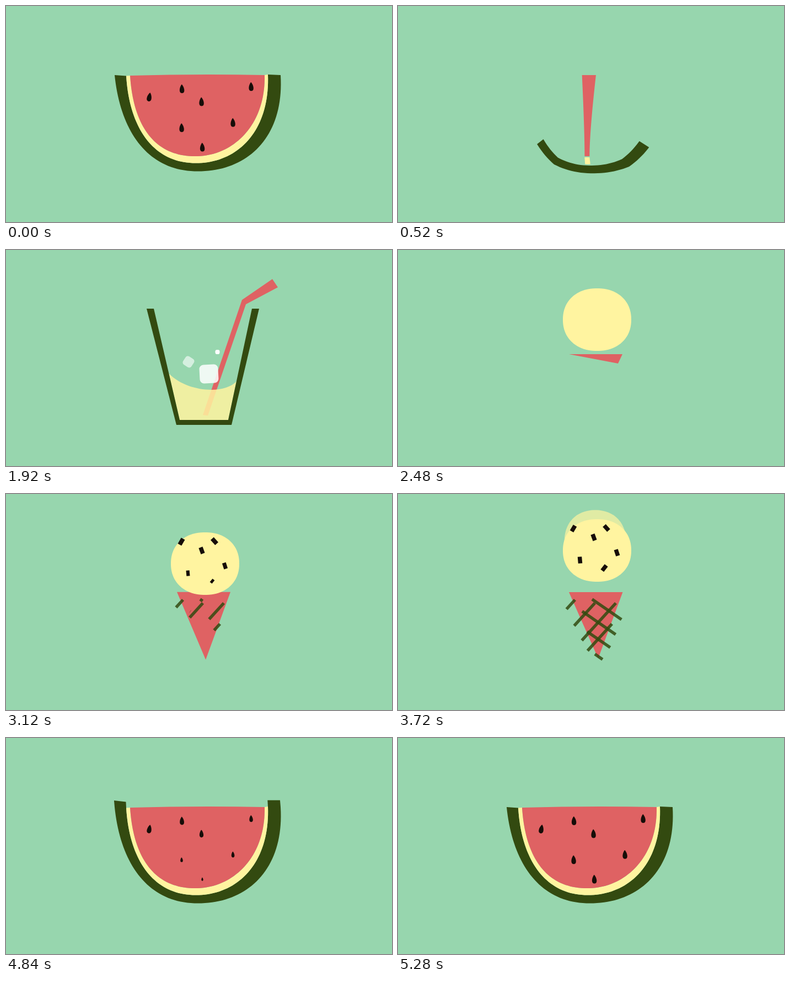
These frames come from a looping animation (700 by 394 pixels, 5520 ms). An HTML page with a canvas:

```html
<!DOCTYPE html>
<html lang="en">
<head>
<meta charset="utf-8">
<title>Summer treats</title>
<style>
  html, body { margin: 0; width: 100%; height: 100%; overflow: hidden; background: #97d6ae; }
  canvas { display: block; }
</style>
</head>
<body>
<canvas id="stage" width="700" height="394"></canvas>
<script>
const ctx = document.getElementById('stage').getContext('2d');
const LOOP = 5520, STEP = 40;
const BG = '#97d6ae', RIND = '#334a10', CREAM = '#fff4a0', RED = '#df6263', SEED = '#160d08';

// Easing over a time span: plain, overshooting, and there-and-back.
const part = (t, a, b) => Math.min(1, Math.max(0, (t - a) / (b - a)));
const ramp = (t, a, b) => { const k = part(t, a, b); return k * k * (3 - 2 * k); };
const back = (t, a, b) => { const d = part(t, a, b) - 1; return 1 + 2 * d ** 3 + d * d; };
const hump = (t, a, b) => Math.sin(Math.PI * part(t, a, b));

const mix = (a, b, k) => a + (b - a) * k;
const mixAll = (a, b, k) => a.map((v, i) => mix(v, b[i], k));

function bez(p, u) {
  const v = 1 - u, w = [v ** 3, 3 * v * v * u, 3 * v * u * u, u ** 3];
  return [0, 1].map(d => w.reduce((sum, k, i) => sum + k * p[i][d], 0));
}
function fillPoly(pts, color) {
  ctx.beginPath();
  pts.forEach(p => ctx.lineTo(...p));
  ctx.fillStyle = color;
  ctx.fill();
}
function at(x, y, angle, scale, draw) {
  ctx.save();
  ctx.translate(x, y);
  ctx.rotate(angle * Math.PI / 180);
  ctx.scale(scale, scale);
  draw();
  ctx.restore();
}

// Melon arcs: left and right halves, each from the top end to the bottom.
const arc = (left, l1, l2, low, r2, r1, right) => [[left, l1, l2, low], [right, r1, r2, low]];
const OUTER = arc([197, 126], [208, 233], [260, 302], [348, 301.5], [436, 302], [505, 241], [498, 126]);
const INNER = arc([218, 127.5], [224, 226], [270, 287], [344, 286.5], [419, 287], [479, 229], [475, 125]);
const FLESH = arc([225, 127], [231, 221], [271, 274.5], [343, 274], [411, 274.5], [471, 218], [469, 126]);

const stops = from => [from, ...Array.from({ length: 41 }, (_, i) => i / 40).filter(u => u > from)];

// Band between two edges, each edge a function of side and position.
function band(a, b, trims, color) {
  const [l, r] = trims.map(stops);
  fillPoly([
    ...l.map(u => a(0, u)), ...r.map(u => a(1, u)).reverse(),
    ...r.map(u => b(1, u)), ...l.map(u => b(0, u)).reverse()
  ], color);
}

// Glass corners, left to right, outer and inner; it tips upright as it opens.
function glass(t) {
  const k = ramp(t, 1040, 1120), a = mix(10, 0, k) * Math.PI / 180;
  const spread = mix(76, 102, k), high = mix(201, 212, k), lean = mix(-8, -2, k);
  const walls = (thick, foot, floor) =>
    [[lean - spread + thick, -high], [-foot, -floor], [foot, -floor], [lean + spread - thick, -high]]
      .map(([x, y]) => [
        359 + x * Math.cos(a) - y * Math.sin(a),
        mix(310, 319, k) + x * Math.sin(a) + y * Math.cos(a)
      ]);
  return { outer: walls(0, 50, 0), inner: walls(mix(8, 13, k), 44, 9) };
}

const CORNER = .7;
function wall(c, side, u) {
  const [top, foot, other] = side ? [c[3], c[2], c[1]] : c;
  return u < CORNER
    ? mixAll(top, foot, u / CORNER)
    : mixAll(foot, other, (u - CORNER) / (1 - CORNER) / 2);
}

function drawRind(t) {
  const melting = t < 2480;
  const trims = [3955, 3808].map(start => melting
    ? (ramp(t, 80, 560) - ramp(t, 560, 1000)) / 2 + ramp(t, 1920, 2400)
    : 1 - back(t, start, 5280));
  if (trims[1] >= 1) return;
  const morph = melting ? ramp(t, 440, 760) : 0, { outer, inner } = glass(t);
  const edge = (melon, corners) => (side, u) =>
    mixAll(bez(melon[side], u), wall(corners, side, u), morph);
  band(edge(OUTER, outer), edge(INNER, inner), trims, RIND);
}

// How far the melon's filling is pulled down on each side.
const trimsAt = t => [0, 30].map(lead =>
  t < 600 ? ramp(t, 100, 560) : 1 - ramp(t + lead, 4160, 4640));

function drawCream(t) {
  band((s, u) => bez(INNER[s], u), (s, u) => bez(FLESH[s], u), trimsAt(t), CREAM);
}

// A flat top, bulging sides and a rounded bottom; fully trimmed it is a cone.
function drawFlesh(t) {
  const early = t < 600, trims = trimsAt(t);
  const rise = early ? 1 : ramp(t, 3720, 4160);
  const wide = early ? 1 - ramp(t, 40, 320) : ramp(t, 4400, 4640);
  const narrow = early ? ramp(t, 360, 600) : 0;
  const shift = ([x, y]) => [x + 20 * (1 - rise), y + 26 * (1 - rise)];
  const tops = [310, 407.5].map((x, s) =>
    mixAll([mix(x, 342, narrow), mix(179, 126, rise)], FLESH[s][0], wide));
  const ends = trims.map((u, s) => shift(bez(FLESH[s], u)));
  const bends = ends.map((e, s) => mixAll(
    mixAll(tops[s], e, .5), [e[0], mix(e[1], tops[s][1], .3)], rise));
  ctx.beginPath();
  ctx.moveTo(...tops[0]);
  ctx.quadraticCurveTo(...bends[0], ...ends[0]);
  stops(trims[0]).forEach(u => ctx.lineTo(...shift(bez(FLESH[0], u))));
  stops(trims[1]).reverse().forEach(u => ctx.lineTo(...shift(bez(FLESH[1], u))));
  ctx.quadraticCurveTo(...bends[1], ...tops[1]);
  ctx.quadraticCurveTo(345, mix(tops[0][1], 123.5, wide), ...tops[0]);
  ctx.fillStyle = RED;
  ctx.fill();
}

const PIPS = [[260, 166], [319, 151], [354.5, 174.5], [444.5, 147], [411.5, 212.5], [318.5, 222], [356, 257.5]];
function drawPips(t) {
  ctx.fillStyle = SEED;
  PIPS.forEach(([x, y], i) => {
    const d = i * 25;
    const size = 1 - ramp(t, 40 + d, 200 + d) + back(t, 4640 + d, 5080 + d);
    at(x, y, i ? -2 : 10, size, () => {
      ctx.beginPath();
      ctx.moveTo(0, -8);
      ctx.bezierCurveTo(4, -4, 7, 8, 0, 8);
      ctx.bezierCurveTo(-7, 8, -4, -4, 0, -8);
      ctx.fill();
    });
  });
}

// Foot, elbow and tip, then the half width at each of them.
const STRAIGHT = [357.5, 285.5, 345.5, 110, 341.5, 47.5, 4.5, 0, 4.5, 0, 4.5, -.5];
const BENT = [361.5, 301.5, 431.5, 95, 482.5, 70, 4.5, .5, 3.5, 4, 5, 7.5];
const FOLDED = [310, 190, 310, 190, 403, 199, 0, 0, 0, 0, 4, -8];
function drawStraw(t) {
  let p = mixAll(STRAIGHT, BENT, back(t, 1160, 1480));
  const sip = ramp(t, 1640, 1920), hidden = 1 - back(t, 600, 1000);
  p[3] += 60 * hidden;
  p[4] += 5.5 * sip;
  p[5] += 80 * hidden - 9.5 * sip;
  p = mixAll(p, FOLDED, ramp(t, 2160, 2480));
  const sideAt = sign => [0, 2, 4].map(i => [p[i] + sign * p[i + 6], p[i + 1] + sign * p[i + 7]]);
  fillPoly([...sideAt(-1), ...sideAt(1).reverse()], RED);
}

function drawCone(t) {
  const k = back(t, 2480, 3280), y = mix(190, 179, k);
  fillPoly([[310, y], [407, y], mixAll([399, 207], [363, 300], k)], RED);
}

function drawDrink(t) {
  const level = 310 - 169 * (ramp(t, 760, 1040) - ramp(t, 1640, 2200));
  if (level > 295 && t < 1640 || level >= 310) return;
  const calm = ramp(t, 1040, 1480) - ramp(t, 1640, 1920);
  const swell = (1 - calm) * Math.min(1, (310 - level) / 85);
  const slosh = swell * (17 - 21 * Math.cos((t - 1040) / 880 * 3 * Math.PI));
  const [tl, bl, br, tr] = glass(t).inner;
  const onWall = (a, b, y) => mix(a[0], b[0], (y - a[1]) / (b[1] - a[1]));
  const yr = level + slosh / 2.7;
  const xl = onWall(tl, bl, level), xr = onWall(tr, br, yr);
  ctx.globalAlpha = .85;
  ctx.beginPath();
  ctx.moveTo(xl, level);
  ctx.bezierCurveTo(mix(xl, xr, .28), level + 35 * swell, mix(xl, xr, .83), level + slosh, xr, yr);
  ctx.lineTo(...br);
  ctx.lineTo(...bl);
  ctx.fillStyle = CREAM;
  ctx.fill();
  ctx.globalAlpha = 1;
}

// x, y, side, angle, opacity
const ICE = [[368, 226, 34, -3, .85], [331, 204, 18, 33, .6], [383.5, 186, 8, 0, 1]];
function drawIce(t) {
  const drop = 60 * (ramp(t, 1640, 1920) - 1);
  const size = back(t, 1160, 1480) * (1 - ramp(t, 1960, 2160));
  ctx.fillStyle = '#fff';
  for (const [x, y, side, angle, alpha] of ICE) {
    ctx.globalAlpha = alpha;
    at(x, y + drop, angle, size, () => {
      ctx.beginPath();
      ctx.roundRect(-side / 2, -side / 2, side, side, 2 + side / 6);
      ctx.fill();
    });
  }
  ctx.globalAlpha = 1;
}

function blob() {
  const soft = v => Math.sign(v) * Math.abs(v) ** .92;
  ctx.beginPath();
  for (let i = 0; i < 90; i++) {
    const a = i / 45 * Math.PI;
    ctx.lineTo(62 * soft(Math.cos(a)), 57 * soft(Math.sin(a)));
  }
  ctx.fillStyle = CREAM;
  ctx.fill();
}

// x, y, angle
const CHIPS = [[-43, -40, 30], [17, -41, -42], [-6, -24, -20], [36, 4, -18], [-31, 17.5, -5], [13, 32, 38]];
function drawScoop(t) {
  const up = back(t, 2160, 2480), fall = part(t, 3720, 4080);
  const y = mix(300, 127, up) - 24 * ramp(t, 3560, 3720) + 190 * fall * fall;
  const size = up * (1 - ramp(t, 3760, 4080));
  const lift = 25 * part(t, 3560, 3800);
  if (lift) {
    ctx.globalAlpha = .7 * (1 - ramp(t, 3760, 3920));
    at(361 - lift * .2, y - lift, 0, size, () => {
      ctx.scale(1 - lift / 170, 1);
      blob();
    });
    ctx.globalAlpha = 1;
  }
  at(361, y, 0, size, () => {
    blob();
    ctx.fillStyle = SEED;
    CHIPS.forEach(([cx, cy, angle], i) => {
      const k = back(t, 2900 + i * 30, 3220 + i * 30) * (1 - ramp(t, 3720, 3860));
      at(cx, cy, angle, k, () => ctx.fillRect(-3.75, -6, 7.5, 12));
    });
  });
}

// Start x, y and length; the first four lean left, the others right.
const WAFFLE = [[321, 193, 23], [357, 199, 56], [395, 199, 92], [388, 237, 66],
  [352, 192, 65], [334, 214, 74], [343, 251, 51], [357, 292, 17]];
function drawWaffle(t) {
  ctx.strokeStyle = RIND;
  ctx.lineWidth = 5.5;
  ctx.globalAlpha = .85;
  WAFFLE.forEach(([x, y, len], i) => {
    const k = ramp(t, 2960 + i * 30, 3180 + i * 30) - ramp(t, 3720, 3900);
    if (k <= 0) return;
    const [dx, dy] = i < 4 ? [-.67, .74] : [.82, .57];
    ctx.beginPath();
    ctx.moveTo(x, y);
    ctx.lineTo(x + dx * len * k, y + dy * len * k);
    ctx.stroke();
  });
  ctx.globalAlpha = 1;
}

// Stretches the melon downwards while it opens or closes.
function stretched(t, draw) {
  ctx.save();
  ctx.translate(347, 126);
  ctx.scale(1 + .03 * hump(t, 0, 560), 1 + .06 * hump(t, 0, 560) + .08 * hump(t, 3760, 4320));
  ctx.translate(-347, -126);
  draw();
  ctx.restore();
}

function render(t) {
  ctx.fillStyle = BG;
  ctx.fillRect(0, 0, 700, 394);
  if (t < 600 || t >= 3720) {
    stretched(t, () => {
      drawRind(t);
      drawCream(t);
    });
    drawFlesh(t);
    drawPips(t);
  } else if (t < 2480) {
    drawStraw(t);
    drawDrink(t);
    drawIce(t);
    drawRind(t);
  } else {
    drawCone(t);
  }
  if (t > 2160 && t < 4080) {
    drawWaffle(t);
    drawScoop(t);
  }
}

const start = performance.now();
function tick() {
  const t = (performance.now() - start) % LOOP;
  render(Math.floor(t / STEP) * STEP);
  requestAnimationFrame(tick);
}
tick();
</script>
</body>
</html>
```
